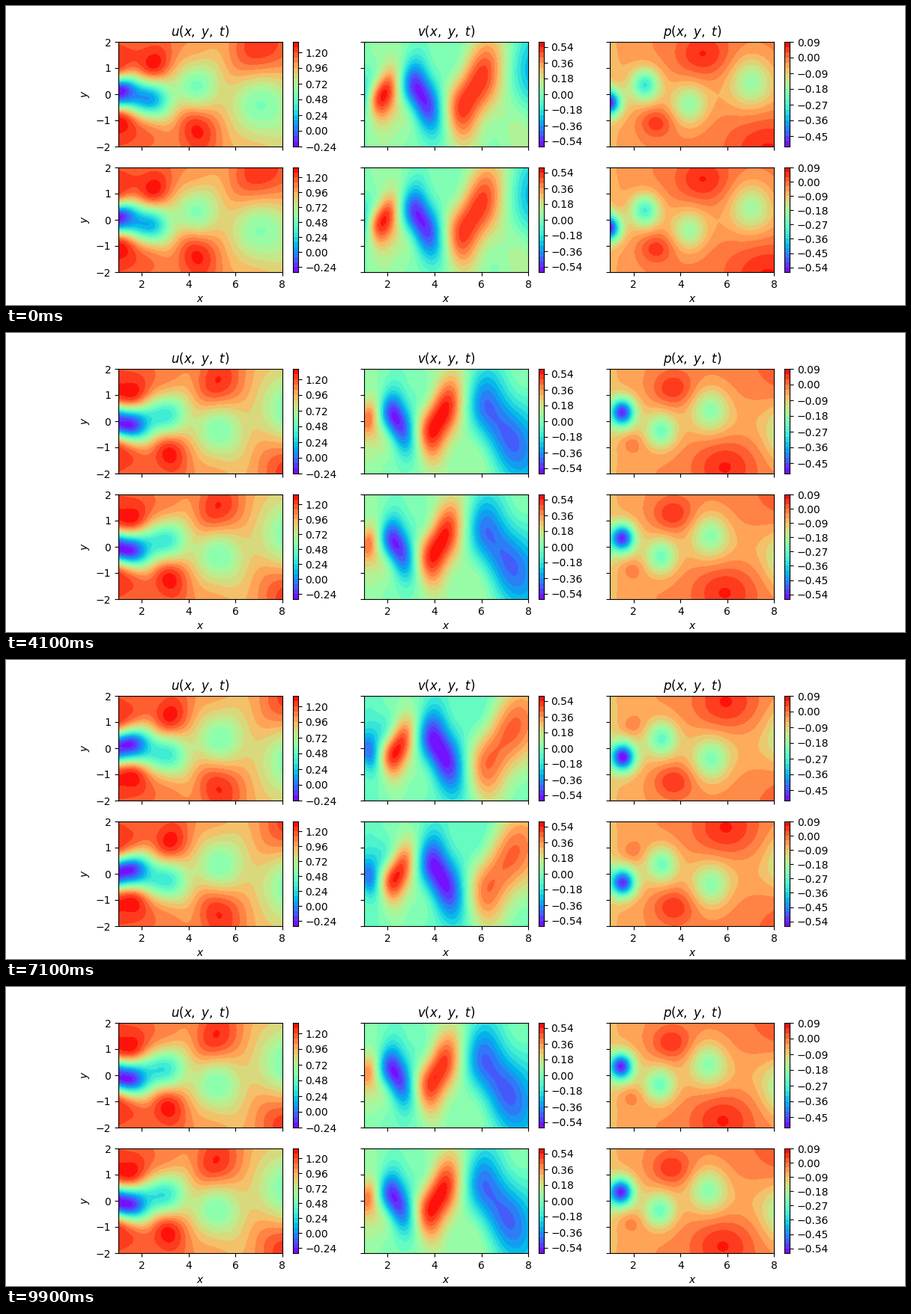
Recreate the animation shown at these times as a matplotlib script. Size 1200 px wide and 400 px high, loop 10000 ms.

```python
import numpy as np
import matplotlib.pyplot as plt
from matplotlib.animation import FuncAnimation
from matplotlib.ticker import MaxNLocator

W, H, DPI = 1200, 400, 100
FRAMES, INTERVAL = 100, 100
PERIOD = 59                      # frames per shedding cycle
RAINBOW = plt.get_cmap("rainbow")

xs = np.linspace(1, 8, 220)
ys = np.linspace(-2, 2, 141)
X, Y = np.meshgrid(xs, ys)
DX, DY = xs[1] - xs[0], ys[1] - ys[0]


# Wake phase, in cycles, of a structure at streamwise position x, and its inverse
def phase(x):
    return 0.5 + 0.295 * (x - 2.5) - 0.0165 * (x - 2.5) ** 2


def position(s):
    return 2.5 + (0.295 - np.sqrt(0.295 ** 2 - 0.066 * (s - 0.5))) / 0.033


def sigmoid_drop(x, mid, width):
    return 1 / (1 + np.exp((x - mid) / width))


def bump(x0, y0, rx, ry):
    return np.exp(-((X - x0) / rx) ** 2 - ((Y - y0) / ry) ** 2)


# Time-averaged flow
outer = 1.05 + 0.25 * np.exp(-(X - 1) / 3 - ((np.abs(Y) - 1.1) / 1.2) ** 2)
centre = 0.74 - sigmoid_drop(X, 2.4, 0.6)
power = 2 + 0.5 * np.exp(-(X - 1))
deficit = np.exp(-np.abs(Y / (0.6 + 0.12 * (X - 1))) ** power)
U_MEAN = outer - (outer - centre) * deficit
V_MEAN = -0.2 * Y * np.exp(-Y ** 2 - (X - 2) ** 2)
P_MEAN = (0.01 - 0.05 * np.exp(-(X - 1) / 1.2)
          - 0.03 * np.exp(-(Y / 0.9) ** 2))

# Streamfunction amplitudes of the first two shedding harmonics
wave = 2 * np.pi * (0.295 - 0.033 * (X - 2.5))
amp = 0.81 * np.exp(-0.09 * (X - 1)) * (1 - 0.65 * np.exp(-(X - 1) / 0.9))
core = np.exp(-(Y / (0.65 + 0.2 * (X - 1))) ** 2)
PSI_1 = amp * (0.85 * core + 0.15 * np.exp(-(Y / 2.6) ** 2)) / wave
PSI_2 = -0.25 * amp * Y * core / wave
PHASE = phase(X)


def velocity(tau):
    theta = 2 * np.pi * (PHASE - tau)
    psi = PSI_1 * np.cos(theta) + PSI_2 * np.cos(2 * theta)
    psi_y, psi_x = np.gradient(psi, DY, DX)
    return U_MEAN + psi_y, V_MEAN - psi_x


def pressure(tau):
    p = P_MEAN.copy()
    start = int(np.ceil(2 * (-0.3 - tau)))
    for n in range(start, start + 5):
        s = tau + n / 2
        if s > 1.8:
            break
        x = position(s)
        side = -1 if n % 2 == 0 else 1
        # low-pressure vortex core
        depth = 0.15 + 0.3 * sigmoid_drop(x, 2.2, 0.4)
        p -= depth * bump(x, side * (0.3 + 0.03 * x),
                          0.5 + 0.06 * (x - 1), 0.5 + 0.07 * (x - 1))
        # high pressure just downstream on the other side
        xh = x + 0.3 + 0.06 * x
        r = max(0.4, 0.15 + 0.19 * xh)
        height = 0.085 * np.clip((xh - 1) / 1.8, 0, 1)
        p += height * bump(xh, -side * (0.4 + 0.23 * xh), r, 0.8 * r)
    return p


EDGE = np.exp(-(X - 1) / 0.2)


def fields(frame):
    tau = (frame % PERIOD) / PERIOD
    u, v = velocity(tau)
    p = pressure(tau)
    return (u, v, p,
            u - 0.07 * EDGE * np.exp(-(Y / 0.3) ** 2),
            0.985 * v,
            p - 0.05 * EDGE * np.exp(-(Y / 0.6) ** 2))


def palette(n):
    return RAINBOW((np.arange(n) + 0.5) / n)[:, :3]


def shade(z):
    """Filled-contour colours with about twenty automatic levels."""
    low, high = z.min(), z.max()
    levels = MaxNLocator(21, min_n_ticks=1).tick_values(low, high)
    first = levels[levels <= low][-1]
    last = levels[levels >= high][0]
    n = int(round((last - first) / (levels[1] - levels[0])))
    band = ((z - first) / (last - first) * n).astype(int)
    return palette(n)[np.clip(band, 0, n - 1)]


# Layout: 2 x 3 cells, each a map with a slim colour bar
CELL = 930 / 3.4
PITCH = 1.2 * CELL
ROWS = (212, 44)
# lower bound, upper bound, level step of each colour bar
BARS = ((-0.24, 1.36, 0.08), (-0.6, 0.6, 0.06), (-0.51, 0.09, 0.03),
        (-0.32, 1.36, 0.08), (-0.6, 0.6, 0.06), (-0.57, 0.09, 0.03))

fig = plt.figure(figsize=(W / DPI, H / DPI), dpi=DPI, facecolor="white")


def add_axes(x, y, w, h):
    return fig.add_axes([x / W, y / H, w / W, h / H])


def add_bar(x, y, low, high, step):
    ax = add_axes(x, y, 7, 140)
    n = int(round((high - low) / step))
    ax.imshow(palette(n)[:, None, :], extent=(0, 1, low, high),
              origin="lower", aspect="auto", interpolation="nearest")
    ax.set_xticks([])
    ax.yaxis.tick_right()
    gap = 3 * step
    first = int(np.ceil(low / gap - 1e-6))
    last = int(np.floor(high / gap + 1e-6))
    ax.set_yticks(np.arange(first, last + 1) * gap)
    ax.set_ylim(low, high)


def add_map(row, col):
    x, y = 150 + col * PITCH, ROWS[row]
    ax = add_axes(x, y, 0.8 * CELL, 140)
    image = ax.imshow(np.ones(X.shape + (3,)), extent=(1, 8, -2, 2),
                      origin="lower", aspect="auto",
                      interpolation="bilinear")
    ax.set_xticks([2, 4, 6, 8])
    ax.set_yticks([-2, -1, 0, 1, 2])
    ax.tick_params(labelbottom=row == 1, labelleft=col == 0)
    if row == 0:
        ax.set_title(rf"${'uvp'[col]}(x,\ y,\ t)$")
    else:
        ax.set_xlabel("$x$")
    if col == 0:
        ax.set_ylabel("$y$")
    add_bar(x + 0.85 * CELL, y, *BARS[3 * row + col])
    return image


images = [add_map(row, col) for row in range(2) for col in range(3)]


def update(frame):
    for image, z in zip(images, fields(frame)):
        image.set_data(shade(z))
    return images


anim = FuncAnimation(fig, update, frames=FRAMES, interval=INTERVAL,
                     repeat=True, repeat_delay=0, blit=False)
plt.show()
```
